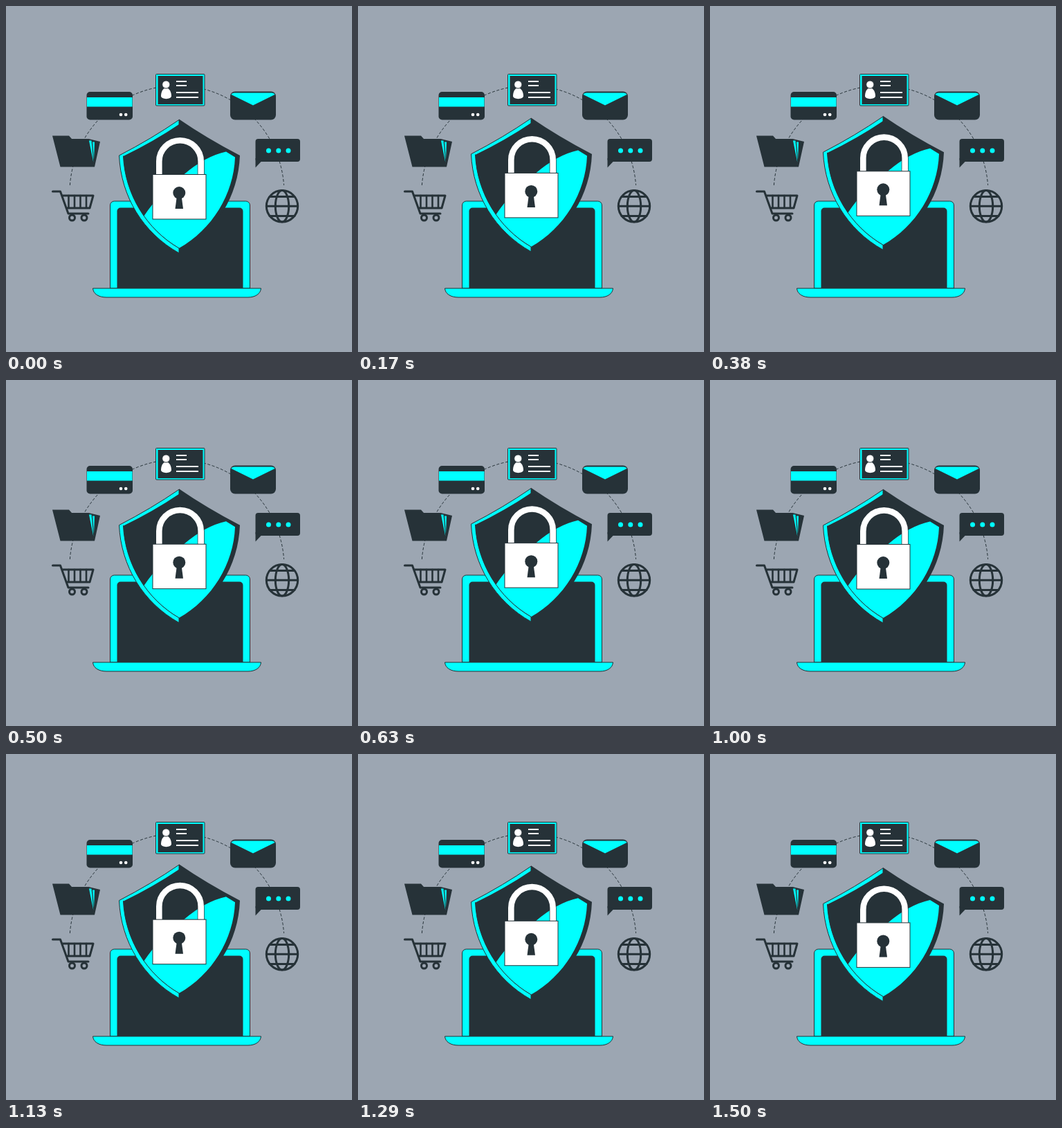
These frames come from a looping animation (500 px wide and 500 px high, 1540 ms). An HTML page:

```html
<!DOCTYPE html>
<html lang="en">
<head>
<meta charset="utf-8">
<title>Data protection</title>
<style>
  html, body { margin: 0; height: 100%; overflow: hidden; background: #9ca6b2; }
  svg { display: block; width: 100%; height: 100%; }
  .dark { fill: #263238; }
  .cyan { fill: #0ff; }
  .white { fill: #fff; }
  .line { fill: none; stroke: #263238; stroke-linejoin: round; stroke-linecap: round; }
  .edge { stroke: #263238; stroke-width: 1; }
</style>
</head>
<body>
<svg viewBox="0 0 500 500">
  <path class="line" style="stroke-linecap:butt" stroke-dasharray="4 2.6" d="M92.4 259A155 155 0 0 1 401.6 259"/>

  <g id="id-card">
    <rect class="cyan edge" x="216.5" y="98.5" width="70.5" height="45.5" rx="1"/>
    <rect class="dark" x="219.5" y="101" width="65" height="41"/>
    <path class="white" d="M231.300 118.500c5 0 7.700 6 7.700 11.500 0 5.500-15 5.500-15 0 0-5.500 2.500-11.500 7.300-11.500z"/>
    <circle class="white edge" cx="231.300" cy="113.500" r="5.600"/>
    <path d="M246 109h15M246 115h15M246 125h32M246 132h32" stroke="#fff" stroke-width="1.800"/>
  </g>

  <g id="bank-card">
    <rect class="dark" x="116.500" y="124" width="66.500" height="40.500" rx="5"/>
    <rect class="cyan" x="117" y="132" width="65.500" height="13.500"/>
    <circle class="white" cx="166" cy="157" r="2.300"/>
    <circle class="white" cx="173.200" cy="157" r="2.300"/>
  </g>

  <g id="mail">
    <rect class="dark" x="324" y="123.500" width="66" height="41" rx="7"/>
    <path class="cyan" d="M325.500 128Q326.500 125.500 330 125.500H384Q387.500 125.500 388.500 128L357 143.500Z"/>
  </g>

  <g id="folder">
    <path class="dark" d="M67 187.500H91L95 192H119.500L136 196 128 232.500H78.500Z"/>
    <path class="cyan" d="M120 194.500H123.500L126.300 226ZM125 196.500H128L127 222Z"/>
  </g>

  <g id="chat">
    <rect class="dark" x="360.500" y="192" width="64.500" height="33" rx="4"/>
    <path class="dark" d="M360.500 220V233.500L369.500 224Z"/>
    <g class="cyan">
      <circle cx="379.500" cy="209" r="3.500"/><circle cx="393.800" cy="209" r="3.500"/><circle cx="408" cy="209" r="3.500"/>
    </g>
  </g>

  <g id="cart" class="line" stroke-width="3">
    <path d="M67.500 268H78.500L90 300H119M82 274H126L121 292H87"/>
    <path d="M90.500 274V291M99 274V291M107.500 274V291M116 274V291" stroke-width="2.600"/>
    <circle cx="95.500" cy="306" r="4"/><circle cx="113" cy="306" r="4"/>
  </g>

  <g id="globe" class="line" stroke-width="3">
    <circle cx="399" cy="289.300" r="22.700"/>
    <ellipse cx="399" cy="289.300" rx="9.700" ry="22.700"/>
    <path d="M376.500 289.300H421.500M381 275.500H417M381 303.500H417"/>
  </g>

  <g id="laptop">
    <path class="cyan edge" d="M150.500 408V288a6 6 0 0 1 6-6H346.500a6 6 0 0 1 6 6V408Z"/>
    <path class="dark" d="M160.500 408V296.500a5 5 0 0 1 5-5H337.500a5 5 0 0 1 5 5V408Z"/>
    <path class="cyan edge" d="M125.500 408H368.500C368 416 360 421 350 421H145C134 421 126 416 125.500 408Z"/>
  </g>

  <g id="shield">
    <path class="dark" d="M250 163.500Q290 191 338 216C336 275 303 328 250 357Z"/>
    <path class="cyan edge" d="M250 164.500Q210 192 163.500 216C166 275 198 328 250 357Z"/>
    <path class="dark" d="M250 171Q213 196 169.500 217C172 272 203 323 250 350L331 218Q290 196 250 171Z"/>
    <path class="cyan" d="M331 218.500C329 272 298 323 250 350Q221 333 199 304Q223 268 257 243.500Q288 217 318 210.500Z"/>
    <path class="line" d="M169.500 217C172 272 203 323 250 350"/>
    <path d="M221.300 244V224.500a30.200 30.200 0 0 1 60.400 0V244" class="line" stroke-width="10"/>
    <path d="M221.300 244V224.500a30.200 30.200 0 0 1 60.400 0V244" fill="none" stroke="#fff" stroke-width="8.600"/>
    <rect class="white edge" x="212" y="243.500" width="77" height="64.500"/>
    <circle class="dark" cx="250.300" cy="270" r="9"/>
    <path class="dark" d="M247 274L244.500 293H256L253.500 274Z"/>
  </g>
</svg>
<script>
  const LOOP = 1540, FPS = 24, LAST_STEP = 36;
  const RISE = 9.7, LEAD = 35;
  const shield = document.getElementById("shield");

  // Constant-speed bob: up for half the loop, down for the other half.
  const lift = ms => RISE * (1 - Math.abs(1 - 2 * ((ms + LEAD) % LOOP) / LOOP));

  function draw(now) {
    const step = Math.min(LAST_STEP, Math.floor((now % LOOP + 5) * FPS / 1000));
    const y = lift(0) - lift(step * 1000 / FPS);
    shield.setAttribute("transform", `translate(0 ${y.toFixed(3)})`);
    requestAnimationFrame(draw);
  }
  draw(0);
</script>
</body>
</html>
```
